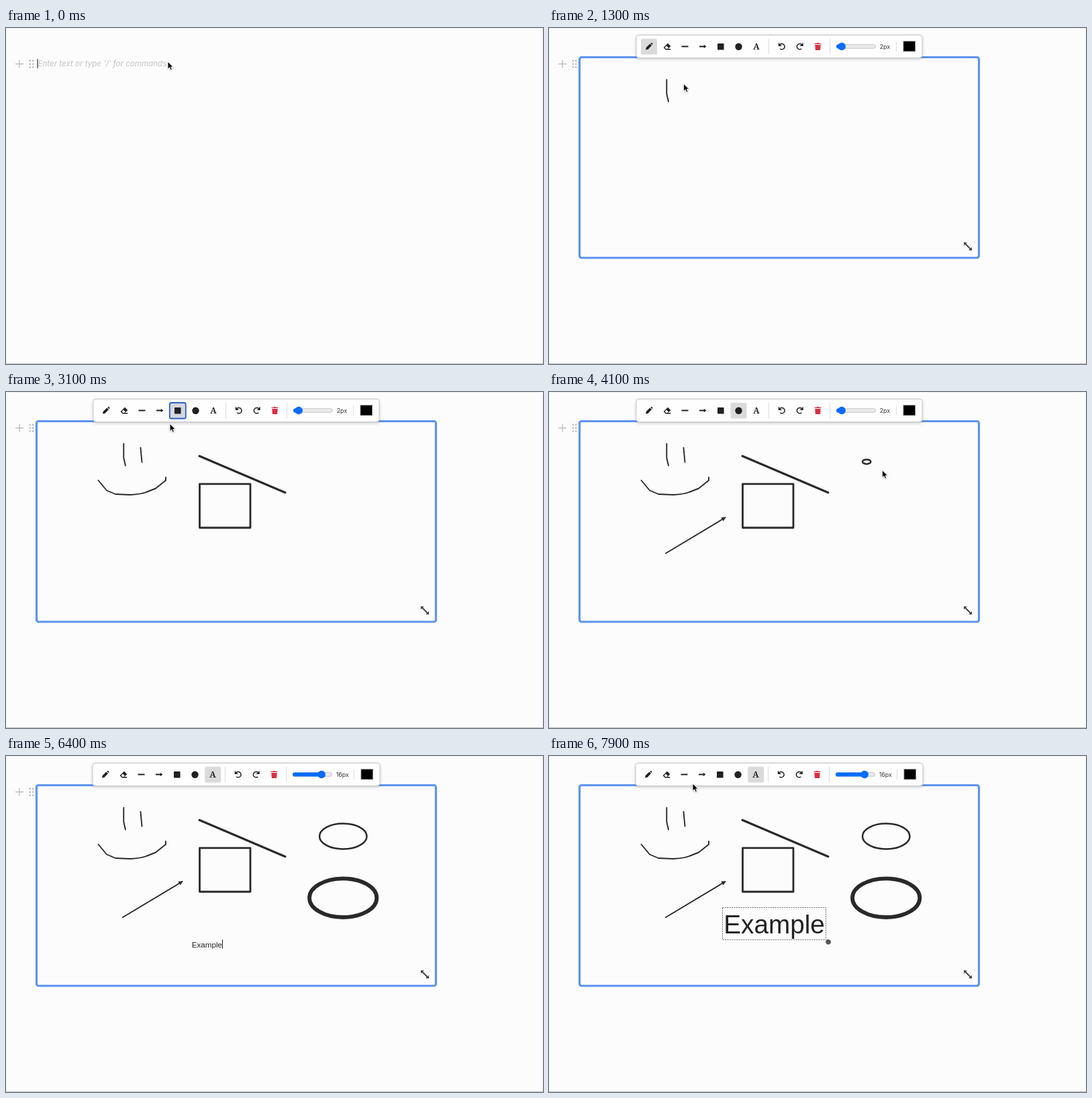
An HTML page that plays this animation: 800 px wide and 500 px high, repeating every 8 s.

```html
<!DOCTYPE html>
<html lang="en">
<head>
<meta charset="utf-8">
<title>Whiteboard block</title>
<style>
  html, body { margin: 0; width: 100%; height: 100%; overflow: hidden; background: #fdfcfc; }
  svg { display: block; width: 800px; height: 500px; }
  .hint { font: italic 11.6px Inter, sans-serif; fill: #c2c2c2; }
  .size { font: 8.9px Inter, sans-serif; fill: #333; }
  .label { font-family: "Liberation Sans", Arial, sans-serif; fill: #222; }
  .ink { fill: none; stroke: #29292b; stroke-linecap: round; stroke-linejoin: round; }
  .icon { fill: #202124; }
  .wire { fill: none; stroke: #202124; stroke-width: 1.5; }
</style>
</head>
<body>
<svg viewBox="0 0 800 500">
  <defs>
    <filter id="shadow" x="-5%" y="-40%" width="110%" height="200%">
      <feDropShadow dx="0" dy="1.5" stdDeviation="2" flood-opacity=".2"/>
    </filter>
    <filter id="soft" x="-50%" y="-50%" width="200%" height="200%">
      <feDropShadow dx="0" dy=".8" stdDeviation=".8" flood-opacity=".3"/>
    </filter>
    <path id="turn" class="wire" d="M-3.8 -1.8A4.2 4.2 0 1 1 -2.8 3.3M-4.5 -5V-1.2H-.7"/>
  </defs>
  <rect width="800" height="500" fill="#fdfcfc"/>
  <path d="M.5 499V.5H799.5V499" fill="none" stroke="#efeff0"/>
  <path d="M0 499.5H800" stroke="#bdbdbd"/>

  <g id="handles" stroke="#bcbcbc">
    <path d="M14 53.5H26M20 47.5V59.5" stroke-width="1.3"/>
    <path d="M35.7 47.6V60M40.2 47.6V60" stroke-width="2.4" stroke-dasharray="2.4 2.4"/>
  </g>

  <g id="hint">
    <text class="hint" x="47.5" y="57">Enter text or type '/' for commands</text>
    <path d="M47 46V60" stroke="#444" stroke-width="1.3"/>
  </g>

  <rect id="frame" x="47" y="44.5" width="592" height="296" fill="none" stroke="#c9c9c9"/>
  <g id="active">
    <rect x="45.5" y="43.5" width="595" height="298.5" rx="3" fill="none" stroke="#5c94ef" stroke-width="3.2"/>
    <path d="M620 321L628 329" stroke="#444" stroke-width="2"/>
    <path d="M618 319H622.8L618 323.8ZM630 331H625.2L630 326.2Z" fill="#444"/>
  </g>

  <g class="ink" stroke-width="1.9">
    <path id="eyeL" pathLength="1" d="M175.3 77V98L178 109.5"/>
    <path id="eyeR" pathLength="1" d="M200.5 83L202.5 104.5"/>
    <path id="smile" pathLength="1" d="M137.5 131.5L150 146.5L163 152L185 153Q202 152 209 149L223 143.5L238 131.5V127"/>
    <path id="line"/>
    <path id="box"/>
    <path id="arrow"/>
    <path id="tip" d="M0 0L-7 -3.2V3.2Z" fill="#29292b" stroke="none"/>
    <ellipse id="oval"/>
    <ellipse id="thickOval"/>
  </g>

  <g id="label">
    <text id="word" class="label"></text>
    <path id="caret" stroke="#222"/>
    <rect id="marquee" fill="none" stroke="#555" stroke-width=".9" stroke-dasharray="2 1.4"/>
    <circle id="grip" r="3.8" fill="#555"/>
  </g>

  <g id="toolbar">
    <rect id="panel" y="10.5" height="34" rx="4" fill="#fefefe" stroke="#c4c4c4" filter="url(#shadow)"/>
    <g id="tools">
      <rect id="picked" y="16" width="24" height="23.5" rx="2.5"/>
      <path class="icon" transform="translate(149 27.5)" d="M-5 5L-4.2 1.4L1.4 -4L4 -1.4L-1.4 4.2ZM2.2 -4.7Q3.6 -6 4.5 -5.2L5.3 -4.4Q6 -3.6 4.7 -2.2Z"/>
      <g class="icon" transform="translate(176 27.5)">
        <path d="M-5.3 1.5L1 -4.7L5.3 -.5L1.5 3.6H5.3V4.9H-2.3Z"/>
        <path d="M-3.4 1.4L-1 -.9L1.9 1.9L.2 3.6H-1.6Z" fill="#fff"/>
      </g>
      <path d="M197.5 27.5H207.5M224 27.5H232" class="wire" style="stroke-width:1.8"/>
      <path d="M230.8 24.7L234.4 27.5L230.8 30.3Z" class="icon"/>
      <rect x="251" y="23" width="9.6" height="9.4" rx="1" class="icon"/>
      <circle cx="282.5" cy="27.7" r="5.2" class="icon"/>
      <text x="309" y="32.2" text-anchor="middle" class="icon" style="font:bold 12.5px 'Noto Serif',serif">A</text>
      <use href="#turn" transform="translate(347 27.5)"/>
      <use href="#turn" transform="translate(373.5 27.5) scale(-1 1)"/>
      <path transform="translate(400.5 27.5)" fill="#d92f42" d="M-5 -4.8H-1.8L-1.3 -5.6H1.3L1.8 -4.8H5V-3.4H-5ZM-4.2 -2.6H4.2L3.6 5.4H-3.6Z"/>
      <path d="M327.5 16V39M418.5 16V39" stroke="#dcdcdc"/>
      <rect x="428.5" y="24.8" width="58" height="5.4" rx="2.7" fill="#ececec" stroke="#b5b5b5" stroke-width=".8"/>
      <rect id="fill" x="428" y="24.4" height="6.2" rx="3.1" fill="#0a6cfb"/>
      <circle id="thumb" cy="27.5" r="5.8" fill="#0a6cfb"/>
      <text id="size" class="size" x="492.7" y="31"></text>
    </g>
    <g id="swatch">
      <path d="M517.5 20V35" stroke="#dcdcdc"/>
      <rect x="528" y="19.8" width="17.5" height="15" fill="#000" stroke="#777" stroke-width=".8"/>
    </g>
  </g>

  <path id="pointer" d="M0 0V11L2.6 8.7L4.4 12.6L6.4 11.7L4.7 8H8.2Z" fill="#000" stroke="#fff" stroke-width=".9" filter="url(#soft)"/>
</svg>
<script>
const LOOP = 8000, STEP = 100, LAG = 58;
const TOOLBAR_BOTTOM = 45, FADE = 200;
const TOOLS = ['pencil', 'eraser', 'line', 'arrow', 'box', 'oval', 'text'];

const $ = id => document.getElementById(id);
const set = (id, attrs) => { for (const k in attrs) $(id).setAttribute(k, attrs[k]); };
const show = (id, on) => { $(id).style.display = on ? '' : 'none'; };
const progress = (t, a, b) => Math.min(1, Math.max(0, (t - a) / (b - a)));
const mix = (a, b, p) => a + (b - a) * p;
const easeOut = p => 1 - (1 - p) ** 2;
const toolX = tool => 149 + 26.7 * TOOLS.indexOf(tool);

// Every gesture gives the pointer position for its progress from 0 to 1.
const rest = (start, end, x, y) => ({ start, end, at: () => [x, y] });
const pick = (start, tool) => ({ ...rest(start, start + 40, toolX(tool), 28), tool });
const trace = (start, end, id) => {
  const length = $(id).getTotalLength();
  return { start, end, at: p => {
    const { x, y } = $(id).getPointAtLength(p * length);
    return [x, y];
  } };
};
const drag = (start, end, from, to, bend = 1) => ({
  start, end, at: p => [mix(from[0], to[0], p), mix(from[1], to[1], p ** bend)]
});

const script = {
  idle: rest(0, 200, 241, 50),
  pencilTool: pick(800, 'pencil'),
  eyeL: trace(1000, 1200, 'eyeL'),
  eyeR: trace(1300, 1400, 'eyeR'),
  smile: trace(1500, 1800, 'smile'),
  lineTool: pick(2040, 'line'),
  line: drag(2100, 2232, [288, 95.3], [416, 149.7], 1.5),
  boxTool: pick(2500, 'box'),
  box: drag(2650, 2840, [288.5, 136.8], [364, 202]),
  arrowTool: pick(3230, 'arrow'),
  arrow: drag(3350, 3540, [174, 240], [264, 186]),
  ovalTool: pick(3800, 'oval'),
  oval: drag(4000, 4240, [467, 100.5], [537.5, 138.5]),
  slider: drag(4600, 4800, [436, 28], [448, 28]),
  thickOval: drag(5110, 5440, [452, 182.3], [552.3, 240]),
  textTool: pick(5700, 'text'),
  place: rest(5900, 6600, 277, 280),
  move: drag(6700, 7000, [300, 280], [282, 234]),
  grow: drag(7100, 7600, [308, 243], [416, 277]),
  leave: rest(7750, LOOP, 214, 41)
};
const gestures = Object.values(script);
const part = (name, t) => progress(t, script[name].start, script[name].end);

function pointerAt(t) {
  const i = gestures.findLastIndex(g => g.start <= t), now = gestures[i], next = gestures[i + 1];
  if (!next || t <= now.end) return now.at(progress(t, now.start, now.end));
  const p = easeOut(progress(t, now.end, next.start)), to = next.at(0);
  return now.at(1).map((v, n) => mix(v, to[n], p));
}

// The ink trails the pointer slightly.
function ink(name, t) {
  const p = part(name, t - LAG);
  show(name, p > 0);
  return { p, from: script[name].at(0), to: script[name].at(p) };
}

function drawStroke(name, t) {
  const { p } = ink(name, t);
  set(name, { 'stroke-dasharray': p < 1 ? `${p} 2` : 'none' });
}

function drawOval(name, t, width) {
  const { from: [x, y], to: [u, v] } = ink(name, t);
  set(name, {
    cx: (x + u) / 2, cy: (y + v) / 2, rx: (u - x) / 2, ry: (v - y) / 2, 'stroke-width': width
  });
}

function drawShapes(t) {
  for (const name of ['eyeL', 'eyeR', 'smile']) drawStroke(name, t);

  const line = ink('line', t);
  set('line', { d: `M${line.from}L${line.to}`, 'stroke-width': line.p < 1 ? 1.9 : 3.1 });

  const { p, from: [x, y], to: [u, v] } = ink('box', t);
  set('box', { d: `M${x} ${y}H${u}V${v}H${x}Z`, 'stroke-width': p < 1 ? 1.9 : 2.8 });

  const arrow = ink('arrow', t), [ax, ay] = arrow.to;
  show('tip', arrow.p > 0);
  set('arrow', { d: `M${arrow.from}L${ax - 3} ${ay + 1.8}` });
  set('tip', { transform: `translate(${ax} ${ay}) rotate(-31)` });

  drawOval('oval', t, 2.5);
  drawOval('thickOval', t, 5.8);
}

function drawLabel(t) {
  const size = mix(11.6, 38.7, part('grow', t)), pad = size * .045, height = size * 1.235;
  const x = mix(276.3, 258.5, part('move', t)), y = mix(273.2, 225.5, part('move', t));
  const selected = t >= script.place.end;
  show('label', t >= script.place.start);
  $('word').textContent = 'Example'.slice(0, Math.max(0, Math.floor((t - 5940) / 60)));
  set('word', { x: x + pad, y: y + size * .99, 'font-size': size });
  const right = x + $('word').getComputedTextLength() + 2 * pad;
  show('caret', !selected);
  show('marquee', selected);
  show('grip', selected);
  set('caret', { d: `M${right} ${y}v13.5` });
  set('marquee', { x, y, width: right - x, height });
  set('grip', { cx: right + 3.5, cy: y + height + 3.5 });
}

function drawToolbar(t) {
  const tool = (gestures.findLast(g => g.tool && g.start <= t) || script.pencilTool).tool;
  const value = tool === 'text' ? 16 : Math.round(mix(2, 7, part('slider', t)));
  const shift = value > 9 ? 1 : 0;
  const thumb = 431.1 + 2.5 * value;
  const focused = tool === 'box';
  set('panel', { x: 130 - shift, width: 426 + 2 * shift });
  set('tools', { transform: `translate(${-shift} 0)` });
  set('swatch', { transform: `translate(${shift} 0)` });
  set('picked', {
    x: toolX(tool) - 12, fill: focused ? '#d6d6de' : '#dadada',
    stroke: focused ? '#2563c4' : 'none', 'stroke-width': 1.8
  });
  set('thumb', { cx: thumb });
  set('fill', { width: thumb - 428 });
  $('size').textContent = value + 'px';
}

// Handles fade while the pointer is over the toolbar or the block is being inserted.
function handleOpacity(t) {
  const samples = 10;
  let seen = 0;
  for (let i = 0; i < samples; i++) {
    const past = Math.max(0, t - i * FADE / samples);
    const inserting = past >= 150 && past < 700;
    if (!inserting && pointerAt(past)[1] > TOOLBAR_BOTTOM) seen++;
  }
  return (seen / samples) ** 2;
}

function draw(t) {
  const inserted = t >= 500, active = t >= 700;
  const typing = (t >= 200 && t < 600) || (t >= 6000 && t < 6500);
  show('hint', !active);
  set('hint', { transform: `translate(0 ${inserted ? 301 : 0})` });
  show('frame', inserted && !active);
  show('active', active);
  show('toolbar', active);
  set('handles', { opacity: handleOpacity(t) });
  drawShapes(t);
  drawLabel(t);
  drawToolbar(t);
  show('pointer', !typing);
  set('pointer', { transform: `translate(${pointerAt(t)})` });
}

const began = performance.now();
function tick() {
  const t = (performance.now() - began) % LOOP;
  draw(Math.floor(t / STEP) * STEP);
  requestAnimationFrame(tick);
}
tick();
</script>
</body>
</html>
```
